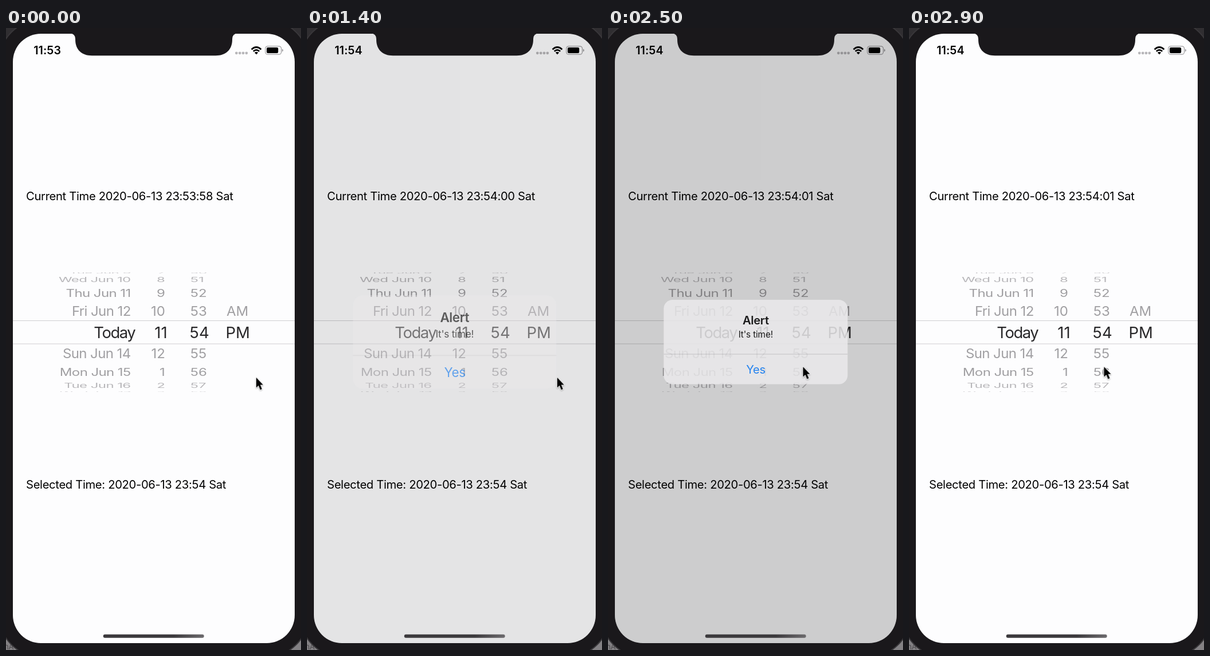
An HTML page for the animation above (3100 ms loop, 515 by 1087 pixels).

```html
<!DOCTYPE html>
<html lang="en">
<head>
<meta charset="utf-8">
<title>Date picker alarm</title>
<style>
html, body { margin: 0; width: 100%; height: 100%; overflow: hidden; background: #1a181b; }
svg { display: block; width: 515px; height: 1087px; }
text {
  font: 20.2px Inter, "Liberation Sans", sans-serif;
  font-optical-sizing: none;
  letter-spacing: -.016em;
  white-space: pre;
}
.mid { text-anchor: middle; }
.end { text-anchor: end; }
.status { font-size: 19.6px; font-weight: 600; letter-spacing: .005em; }
.row text { font-size: 24px; letter-spacing: 0; }
.row .date { letter-spacing: -.024em; }
.now text { font-size: 27.5px; }
.now .date { letter-spacing: -.055em; }
.title { font-weight: 600; }
.note { font-size: 15.4px; letter-spacing: -.012em; }

/* One 3.1 s loop, advancing in 100 ms steps */
.anim { animation: 3.1s step-end infinite; }
#sec58 { animation-name: sec58; }
#sec59 { animation-name: sec59; }
#sec00 { animation-name: sec00; }
#sec01 { animation-name: sec01; }
#min53 { animation-name: min53; }
#min54 { animation-name: min54; }
#dim { animation-name: dim; }
#alert { animation-name: settle; transform-origin: 257.8px 548.7px; }
#panel { animation-name: panel; }
#labels { animation-name: labels; }
#cursor { animation-name: point; }

@keyframes sec58 { 0% { opacity: 1 } 9.67%, 100% { opacity: 0 } }
@keyframes sec59 { 0% { opacity: 0 } 9.67% { opacity: 1 } 41.93%, 100% { opacity: 0 } }
@keyframes sec00 { 0% { opacity: 0 } 41.93% { opacity: 1 } 74.19%, 100% { opacity: 0 } }
@keyframes sec01 { 0% { opacity: 0 } 74.19%, 100% { opacity: 1 } }
@keyframes min53 { 0% { opacity: 1 } 38.7%, 100% { opacity: 0 } }
@keyframes min54 { 0% { opacity: 0 } 38.7%, 100% { opacity: 1 } }
@keyframes dim {
  0% { opacity: 0 }
  45.16% { opacity: .1 }
  48.38% { opacity: .206 }
  51.61% { opacity: .22 }
  54.83% { opacity: .224 }
  80.64% { opacity: .19 }
  83.87% { opacity: .09 }
  87.09% { opacity: .025 }
  90.32% { opacity: .006 }
  93.54%, 100% { opacity: 0 }
}
@keyframes settle {
  0% { transform: scale(1.2) }
  45.16% { transform: scale(1.106) }
  48.38% { transform: scale(1.016) }
  51.61% { transform: scale(1.003) }
  54.83%, 100% { transform: scale(1) }
}
@keyframes panel {
  0% { opacity: 0 }
  45.16% { opacity: .41 }
  48.38% { opacity: .93 }
  51.61% { opacity: .98 }
  54.83% { opacity: 1 }
  80.64% { opacity: .85 }
  83.87% { opacity: .38 }
  87.09% { opacity: .1 }
  90.32% { opacity: .02 }
  93.54%, 100% { opacity: 0 }
}
@keyframes labels {
  0% { opacity: 0 }
  45.16% { opacity: .6 }
  48.38% { opacity: .96 }
  51.61% { opacity: 1 }
  80.64% { opacity: .88 }
  83.87% { opacity: .53 }
  87.09% { opacity: .14 }
  90.32% { opacity: .03 }
  93.54%, 100% { opacity: 0 }
}
@keyframes point {
  0% { transform: translate(435.8px, 609.8px) }
  58.06% { transform: translate(428px, 607px) }
  61.29% { transform: translate(405px, 600px) }
  64.51% { transform: translate(374px, 591px) }
  67.74% { transform: translate(350px, 586px) }
  70.96% { transform: translate(341.5px, 585px) }
  74.19%, 100% { transform: translate(339.5px, 591px) }
}
</style>
</head>
<body>
<svg viewBox="0 0 515 1087">
  <defs>
    <clipPath id="wheel"><rect x="12" y="427" width="492" height="209"/></clipPath>
    <linearGradient id="bar" x2="1" y2="0">
      <stop offset=".7" stop-color="#3c3a3d"/><stop offset="1" stop-color="#6d6b6e"/>
    </linearGradient>
    <filter id="soft" x="-50%" y="-50%" width="200%" height="200%">
      <feDropShadow dx="0" dy="1.2" stdDeviation="1.2" flood-opacity=".35"/>
    </filter>
  </defs>

  <rect width="515" height="540" fill="#302e31"/>
  <rect y="540" width="515" height="547" fill="#838184"/>
  <text x="-3" y="1086" style="font-size:13px" fill="#4c4a4d">nA</text>
  <rect x="-12" y="-14" width="540" height="1113" rx="73" fill="#1a181b" stroke="#39373a" stroke-width="2"/>
  <rect x="12" y="10" width="492" height="1065" rx="49" fill="#fdfdfe"/>

  <g id="clock"></g>
  <text x="35" y="804.8">Selected Time: 2020-06-13 23:54 Sat</text>

  <path d="M12 511.5H504M12 552H504" stroke="#cfced1"/>
  <g id="picker" clip-path="url(#wheel)"></g>

  <g fill="#b7b6b9">
    <circle cx="402.3" cy="43.8" r="2.4"/><circle cx="408.2" cy="43.8" r="2.4"/>
    <circle cx="414" cy="43.8" r="2.4"/><circle cx="419.8" cy="43.8" r="2.4"/>
  </g>
  <rect x="452.8" y="31.8" width="27.8" height="14.4" rx="4.2" fill="none" stroke="#9c9b9e" stroke-width="1.2"/>
  <path d="M482 36.6q2 .8 2 2.4t-2 2.4z" fill="#9c9b9e"/>

  <rect id="dim" class="anim" x="12" y="10" width="492" height="1065" rx="49"/>

  <path d="M111 9Q121 10 121 19V20C121 38 132 48.2 150 48.2H366C384 48.2 395 38 395 20V19Q395 10 405 9Z" fill="#1a181b"/>
  <text id="min53" class="status anim" x="48.2" y="46">11:53</text>
  <text id="min54" class="status anim" x="48.2" y="46">11:54</text>
  <path d="M428.6 37.4Q437 29.6 445.4 37.4M431.8 40.7Q437 35.9 442.2 40.7" fill="none" stroke="#000" stroke-width="2.7"/>
  <path d="M437 46.2l-3.1-3.2q3.1-2.6 6.2 0z"/>
  <rect x="455" y="34" width="20.2" height="10" rx="2.2"/>
  <rect x="169.7" y="1059.8" width="176" height="6" rx="3" fill="url(#bar)"/>

  <g id="alert" class="anim">
    <g id="panel" class="anim">
      <rect x="97.3" y="475" width="321" height="147.6" rx="15.5" fill="#ebeaec"/>
      <path d="M97.3 570H418.3" stroke="#c0bfc2"/>
    </g>
    <g id="labels" class="anim">
      <text class="mid title" x="257.8" y="517.6">Alert</text>
      <text class="mid note" x="257.8" y="541.3">It's time!</text>
      <text class="mid" x="258" y="604.2" fill="#0a76f0">Yes</text>
    </g>
  </g>

  <g id="cursor" class="anim">
    <path d="M1 1V18.8L5 15.1 8 22.4 11 21.1 8 13.8H13Z" stroke="#fff" stroke-width="1.5" stroke-linejoin="round" paint-order="stroke" filter="url(#soft)"/>
  </g>
</svg>
<script>
const times = { sec58: '23:53:58', sec59: '23:53:59', sec00: '23:54:00', sec01: '23:54:01' };
document.getElementById('clock').innerHTML = Object.entries(times).map(([id, time]) =>
  `<text id="${id}" class="anim" x="35" y="300.6">Current Time 2020-06-13 ${time} Sat</text>`).join('');

const days = ['Tue Jun 9', 'Wed Jun 10', 'Thu Jun 11', 'Fri Jun 12', 'Today',
  'Sun Jun 14', 'Mon Jun 15', 'Tue Jun 16', 'Wed Jun 17'];
const shades = ['#29282a', '#a09fa2', '#9f9ea1', '#b8b7ba', '#d2d1d4'];

// Rows sit on a cylinder; the centre row is flat and slightly enlarged.
function row(day, i) {
  const k = i - 4, angle = k * 20.4 * Math.PI / 180;
  const y = 532.2 + 106 * Math.sin(angle);
  const [date, hour, min, half] = k ? [217.7, 277.8, 321.8, 385] : [225.2, 281.6, 320.6, 383.5];
  const base = k ? 8.7 : 10;
  const text = (x, cls, str) => `<text x="${x}" y="${base}" class="${cls}">${str}</text>`;
  const period = { '-1': 'AM', 0: 'PM' }[k];
  return `<g class="row ${k ? '' : 'now'}" fill="${shades[Math.abs(k)]}"
    transform="translate(0 ${y}) scale(1 ${Math.cos(angle)})">` +
    text(date, 'end date', day) + text(hour, 'end', (10 + k) % 12 + 1) +
    text(min, '', 54 + k) + (period ? text(half, '', period) : '') + '</g>';
}
document.getElementById('picker').innerHTML = days.map(row).join('');
</script>
</body>
</html>
```
